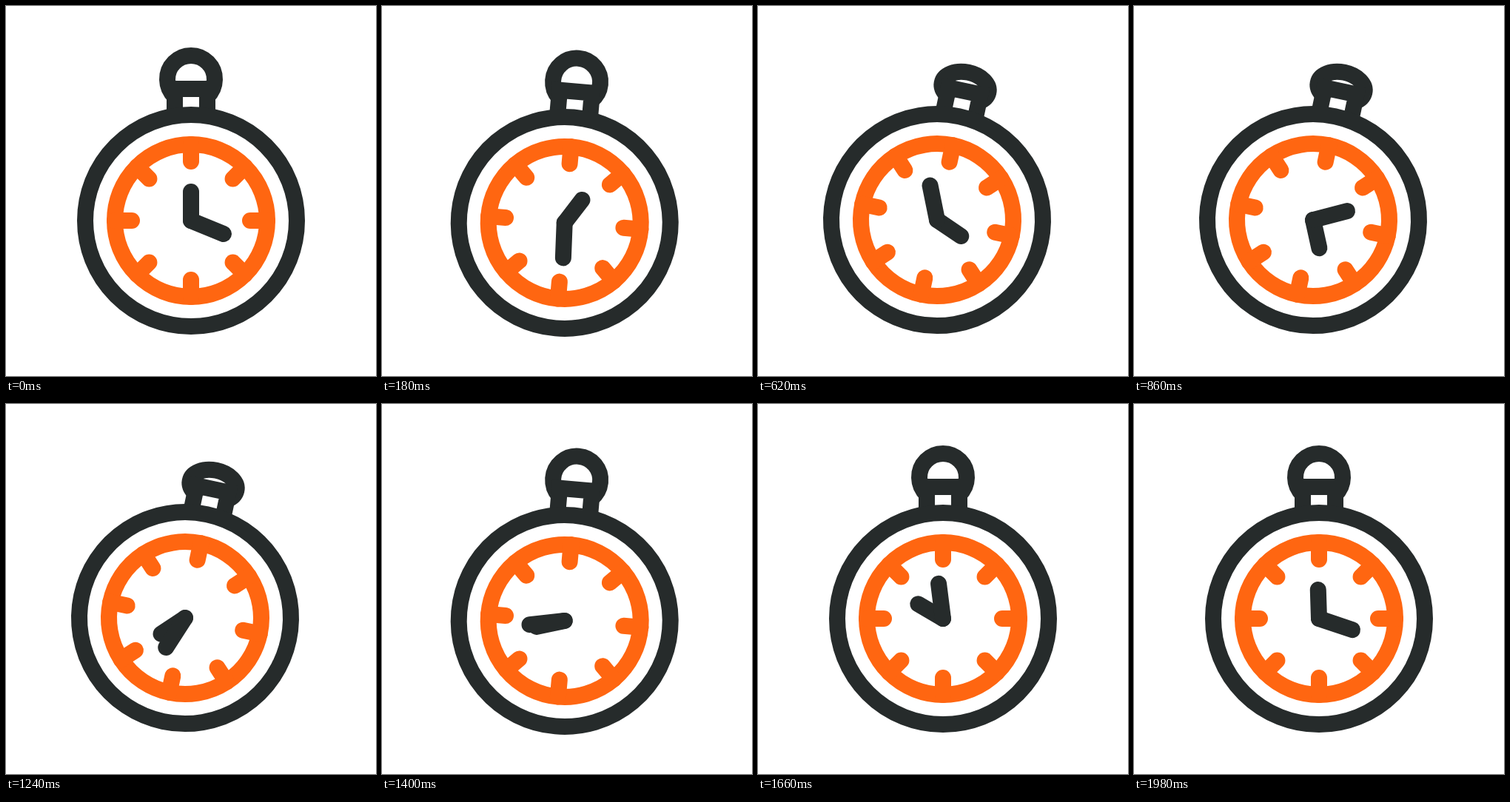
Recreate the animation shown at these times as an HTML page. Size 500 by 500 pixels, loop 2000 ms.

```html
<!DOCTYPE html>
<html lang="en">
<head>
<meta charset="utf-8">
<title>Stopwatch</title>
<style>
  html, body { margin: 0; width: 100%; height: 100%; overflow: hidden; background: #fff; }
  svg { display: block; width: 100%; height: 100%; }
  g { fill: none; stroke: #262b2b; stroke-width: 22; }
  .face { stroke: #ff6611; }
  .round { stroke-linecap: round; }
</style>
</head>
<body>
<svg viewBox="0 0 500 500">
  <g id="watch">
    <path id="loop"/>
    <path d="M-22 -145V-178H22V-145"/>
    <circle r="143"/>
    <g class="face round" id="ticks"><circle r="103"/></g>
    <g class="round">
      <path id="shortHand" d="M0 0V-39"/>
      <path id="longHand" d="M0 0V-47.5"/>
    </g>
  </g>
</svg>
<script>
const PERIOD = 2000, STEP = 20, SPIN = 1990;
const $ = id => document.getElementById(id);
const set = (id, name, value) => $(id).setAttribute(name, value);

const ramp = (t, a, b) => Math.min(1, Math.max(0, (t - a) / (b - a)));
const smooth = u => u * u * (3 - 2 * u);
const easeOut = u => 1 - (1 - u) ** 2;

for (let i = 0; i < 8; i++) {
  $("ticks").insertAdjacentHTML("beforeend",
    `<path d="M0 -80V-103" transform="rotate(${i * 45})"/>`);
}

function draw(t) {
  // The watch tilts along a shallow arc, then swings back.
  const tilt = smooth(ramp(t, 0, 410)) - easeOut(ramp(t, 1260, 1650));
  const x = 250 - 8 * tilt;
  const y = 290 - 0.9 * tilt + 13.6 * tilt * (1 - tilt);
  set("watch", "transform", `translate(${x} ${y}) rotate(${12 * tilt})`);

  // The crown loop is pressed down without thinning its line.
  const press = smooth(ramp(t, 220, 360)) - smooth(ramp(t, 1250, 1390));
  set("loop", "d", `M-22 -167.8A32 ${32 * (1 - 0.35 * press)} 0 1 1 22 -167.8`);

  const turn = 360 * t / SPIN;
  set("shortHand", "transform", `rotate(${turn})`);
  set("longHand", "transform", `rotate(${112.2 + 2 * turn})`);
}

const start = performance.now();
function tick() {
  const t = (performance.now() - start) % PERIOD;
  draw(Math.floor(t / STEP) * STEP);
  requestAnimationFrame(tick);
}
tick();
</script>
</body>
</html>
```
